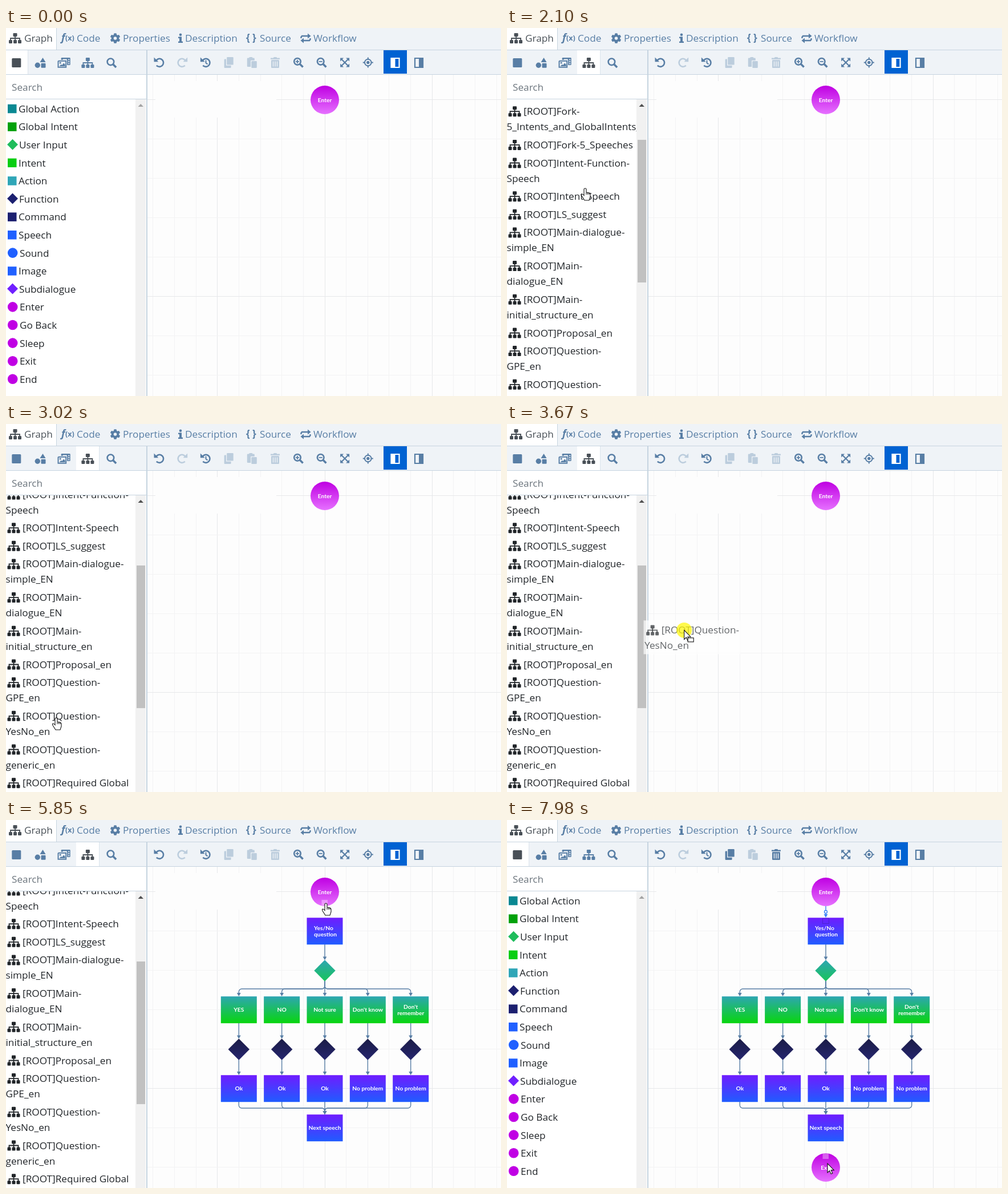
Recreate the animation shown at these times as an HTML page with a canvas. Size 868x645 px, loop 8 s.

```html
<!DOCTYPE html>
<html lang="en">
<head>
<meta charset="utf-8">
<title>Dialogue editor</title>
<style>
html, body { margin: 0; overflow: hidden; background: #fff; }
canvas { display: block; }
</style>
</head>
<body>
<canvas id="stage" width="868" height="645"></canvas>
<script>
const g = document.getElementById('stage').getContext('2d');
const FONT = '"Open Sans", "Noto Sans", sans-serif';
const BLUE = '#587ea5', PALE = '#bccddd', DARK = '#212529', GREY = '#495057';
const BAR = '#eff3f7', EDGE = '#c6d4e0';
const LOOP = 8000;

// ---------- drawing helpers ----------
function rect(x, y, w, h, c) { if (c) g.fillStyle = c; g.fillRect(x, y, w, h); }
function round(x, y, w, h, r = 1.2) { g.beginPath(); g.roundRect(x, y, w, h, r); g.fill(); }
function disc(x, y, r) { g.beginPath(); g.arc(x, y, r, 0, 7); g.fill(); }
function ring(x, y, r, w, a = 0, b = 2 * Math.PI) {
  g.lineWidth = w; g.beginPath(); g.arc(x, y, r, a, b); g.stroke();
}
function trace(p) {
  g.beginPath();
  for (let i = 0; i < p.length; i += 2) g.lineTo(p[i], p[i + 1]);
}
function line(w, ...p) { g.lineWidth = w; trace(p); g.stroke(); }
function poly(...p) { trace(p); g.fill(); }
function diamond(x, y, r) { poly(x, y - r, x + r, y, x, y + r, x - r, y); }
function text(s, x, y, c, font = '17.2px ' + FONT, align = 'left') {
  g.font = font; g.fillStyle = c; g.textAlign = align; g.fillText(s, x, y);
}
function clip(x, y, w, h, draw) {
  g.save(); g.beginPath(); g.rect(x, y, w, h); g.clip(); draw(); g.restore();
}
function ease(t, a, b) {
  const u = Math.min(1, Math.max(0, (t - a) / (b - a)));
  return u * u * (3 - 2 * u);
}

// ---------- icons, centred on 0,0 ----------
const icons = {
  sitemap() {
    round(-3.5, -9, 7, 6);
    line(1.8, -8, 4, -8, 0, 8, 0, 8, 4);
    line(1.8, 0, -4, 0, 4);
    for (const x of [-11, -3, 5]) round(x, 3, 6, 6);
  },
  cog() {
    ring(0, 0, 4.8, 4);
    for (let i = 0; i < 6; i++) { g.rotate(Math.PI / 3); round(-2.4, -8.8, 4.8, 4); }
  },
  info() {
    disc(0, -6.3, 2.3);
    rect(-4, -2.5, 6, 2.5); rect(-2, -2.5, 4, 9); rect(-4, 5.5, 8, 2.5);
  },
  loop() {
    for (let i = 0; i < 2; i++) {
      line(2.4, -8, 0, -8, -2, -6.5, -4, 4, -4);
      poly(3.5, -8.5, 9, -4, 3.5, 0.5);
      g.rotate(Math.PI);
    }
  },
  square() { round(-8, -8, 16, 16, 1.5); },
  shapes() { poly(4.5, -9, 9.5, -1, -0.5, -1); disc(-4.7, 4.2, 4.7); round(1.5, 0.7, 8, 8); },
  media() {
    round(-5, -9, 16, 13);
    for (const y of [-6.5, -3, 0.5]) rect(7.5, y, 2, 2, BAR);
    rect(-2, -6.5, 7, 4);
    rect(-12, -5.2, 17.5, 14.5);
    line(2, -10.2, -3.3, 3.5, -3.3, 3.5, 7.8, -10.2, 7.8, -10.2, -3.3);
    g.fillStyle = g.strokeStyle;
    disc(-6.5, 0, 1.6);
    poly(-8, 6, -5, 2.8, -3.5, 4, -0.5, 0.5, 2, 3, 2, 6);
  },
  search() { ring(-1.7, -1.7, 5.8, 2.6); line(3.4, 2.5, 2.5, 8, 8); },
  undo() { ring(0.6, 0.3, 7, 2.6, -2.7, 2.4); poly(-9, -9, -9, -1.3, -1.3, -1.3); },
  redo() { g.scale(-1, 1); icons.undo(); },
  history() { icons.undo(); line(2, 0.6, -4, 0.6, 0.8, 3.6, 2.8); },
  copy() {
    round(-8, -6, 12, 15.5);
    rect(-4.6, -10, 14, 15.2, BAR);
    g.fillStyle = g.strokeStyle;
    round(-3.4, -9.5, 11.5, 13.6);
  },
  paste() {
    round(-8.5, -8, 13, 15.5); round(-5, -9.5, 6, 4);
    rect(-2.2, -3.6, 12, 14, BAR);
    g.fillStyle = g.strokeStyle;
    round(-1, -2.4, 9.5, 11.9);
  },
  trash() {
    rect(-8, -8, 16, 2.4); round(-3, -9.5, 6, 3); round(-7, -4.5, 14, 14);
    for (const x of [-4.2, -0.7, 2.8]) rect(x, -2, 1.4, 9, BAR);
  },
  zoomOut() { icons.search(); line(1.8, -4.8, -1.7, 1.4, -1.7); },
  zoomIn() { icons.zoomOut(); line(1.8, -1.7, -4.8, -1.7, 1.4); },
  expand() {
    line(2.2, -6, -6, 6, 6); line(2.2, 6, -6, -6, 6);
    for (let i = 0; i < 4; i++) { poly(-8, -8, -2, -8, -8, -2); g.rotate(Math.PI / 2); }
  },
  target() {
    ring(0, 0, 5.8, 2); disc(0, 0, 2.7);
    for (let i = 0; i < 4; i++) { rect(-1, -9, 2, 4); g.rotate(Math.PI / 2); }
  },
  panel() { line(2.2, -7, -8, 7, -8, 7, 8, -7, 8, -7, -9); rect(-7, -8, 7, 16); },
  panelRight() { g.scale(-1, 1); icons.panel(); }
};
function icon(name, x, y, c) {
  g.save();
  g.translate(x, y);
  g.fillStyle = g.strokeStyle = c;
  icons[name]();
  g.restore();
}

// ---------- top bars ----------
function bars(palette, selected) {
  rect(0, 0, 868, 81, BAR);
  rect(0, 0, 88, 38, '#fff');
  rect(88, 0, 1, 38, EDGE);
  rect(0, 38, 868, 1, EDGE);
  icon('sitemap', 16, 18, GREY);
  text('Graph', 32, 24, GREY);
  text('f', 97, 23, BLUE, 'italic bold 18px ' + FONT);
  text('(x)', 104, 22, BLUE, 'bold 12.5px ' + FONT);
  text('Code', 124, 24, BLUE);
  icon('cog', 191.5, 18, BLUE);
  text('Properties', 205, 24, BLUE);
  icon('info', 306, 18, BLUE);
  text('Description', 314, 24, BLUE);
  text('{ }', 421, 23, BLUE, 'bold 17px ' + FONT);
  text('Source', 445, 24, BLUE);
  icon('loop', 525.5, 18, BLUE);
  text('Workflow', 539, 24, BLUE);

  const active = palette ? 0 : 3;
  rect(palette ? 0 : 123, 39, palette ? 38 : 41, 42, '#fff');
  rect(palette ? 38 : 163, 39, 1, 42, '#dbe4ec');
  ['square', 'shapes', 'media', 'sitemap', 'search'].forEach((n, i) =>
    icon(n, 18.3 + 41.7 * i, 61, i === active ? GREY : BLUE));
  ['undo', 'redo', 'history', 'copy', 'paste', 'trash', 'zoomIn', 'zoomOut', 'expand', 'target']
    .forEach((n, i) => {
      const off = n === 'redo' || n === 'paste' || (!selected && (n === 'copy' || n === 'trash'));
      icon(n, 268.5 + 40.7 * i, 60.5, off ? PALE : BLUE);
    });
  rect(662, 39, 41, 41, '#0062d2');
  icon('panel', 682.5, 61, '#fff');
  icon('panelRight', 724, 61, BLUE);
  rect(0, 81, 868, 1, EDGE);
}

// ---------- left panel ----------
const palettes = [
  ['Global Action', 's', '#0a8892'], ['Global Intent', 's', '#02a10b'], ['User Input', 'd', '#1fbd5c'],
  ['Intent', 's', '#08ce12'], ['Action', 's', '#2fa6b7'], ['Function', 'd', '#1c2070'],
  ['Command', 's', '#1c2070'], ['Speech', 's', '#2060ff'], ['Sound', 'c', '#2060ff'],
  ['Image', 's', '#2060ff'], ['Subdialogue', 'd', '#7020ff'], ['Enter', 'c', '#c000e4'],
  ['Go Back', 'c', '#c000e4'], ['Sleep', 'c', '#c000e4'], ['Exit', 'c', '#c000e4'], ['End', 'c', '#c000e4']
];
const dialogues = [
  'Example-|dialogue_EN', 'Fork-|Int_Functions', 'Fork-|5_Intents_and_GlobalIntents_en',
  'Fork-5_Speeches', 'Intent-Function-|Speech', 'Intent-Speech', 'LS_suggest',
  'Main-dialogue-|simple_EN', 'Main-|dialogue_EN', 'Main-|initial_structure_en', 'Proposal_en',
  'Question-|GPE_en', 'Question-|YesNo_en', 'Question-|generic_en', 'Required Global'
];
const ROW = 31.6, TOP = 141.8;

function paletteItem([label, kind, c], y) {
  g.fillStyle = c;
  if (kind === 's') rect(3, y - 8, 15.5, 15.5);
  else if (kind === 'd') diamond(11.5, y - 0.7, 9.5);
  else disc(11.7, y - 0.5, 8.8);
  text(label, { s: 22, d: 23, c: 24 }[kind], y + 6, DARK);
}
function dialogueItem(name, y) {
  const [a, b] = name.split('|');
  icon('sitemap', 13.5, y, DARK);
  text('[ROOT]' + a, 29, y + 6, DARK);
  if (b) text(b, -0.5, y + 33, DARK);
  return b ? ROW + 27.1 : ROW;
}
function panel(palette, scroll) {
  rect(0, 82, 246, 563, '#fff');
  text('Search', 10, 110, '#6c757d');
  clip(0, 125, 228, 520, () => {
    if (palette) palettes.forEach((p, i) => paletteItem(p, TOP + ROW * i));
    else {
      let y = TOP - scroll;
      for (const d of dialogues) y += dialogueItem(d, y);
    }
  });
  rect(0, 124, 246, 1, EDGE);
  rect(227, 125, 18, 520, '#f1f1f1');
  g.fillStyle = scroll > 0 && !palette ? '#505050' : '#a3a3a3';
  poly(231.5, 138, 241, 138, 236.2, 133);
  if (!palette) rect(229, 144 + scroll * 0.46, 15, 250, '#c1c1c1');
  rect(246, 39, 2, 606, EDGE);
}

// ---------- diagram ----------
const MID = 559, cols = [-2, -1, 0, 1, 2].map(i => MID + 75.35 * i);
const BOX = ['#6f1cff', '#205cff'], GREEN = ['#2da6b2', '#08d60e'];
const NAVY = ['#1b1c46', '#25256e'], PINK = ['#bf00e2', '#e671ff'];

function grid() {
  rect(248, 82, 620, 563, '#fdfdfd');
  for (let i = -8; i <= 8; i++)
    rect(Math.floor(MID + 37.65 * i), 82, 1, 563, i % 5 ? '#f3f3f4' : '#e7e8ea');
  for (let j = 0; j < 8; j++)
    rect(248, 125 + 69 * j, 620, 1, j % 5 ? '#f3f3f4' : '#e7e8ea');
  rect(262, 93, 212, 64, '#fdfdfd');
}
function shade(y, h, [a, b]) {
  const s = g.createLinearGradient(0, y - h, 0, y + h);
  s.addColorStop(0, a); s.addColorStop(1, b);
  g.fillStyle = s;
}
function label(s, x, y, align = 'center') {
  const rows = s.split('|');
  rows.forEach((r, i) =>
    text(r, x, y + 3.7 + 11 * (i - (rows.length - 1) / 2), '#fff', 'bold 10.3px Lato, sans-serif', align));
}
function box(x, y, colors, s) {
  shade(y, 23.5, colors);
  g.fillRect(x - 31.5, y - 23.5, 63, 47);
  if (s[0] === 'Y' && s.includes('|')) label(s, x - 19, y, 'left');
  else label(s, x, y);
}
function gem(x, y, colors) { shade(y, 18.5, colors); diamond(x, y, 18.7); }
function ball(y, s, port) {
  shade(y, 25, PINK);
  disc(MID, y, 25);
  label(s, MID, y);
  if (port) rect(553.5, port, 10.5, 10, 'rgba(255,255,255,.35)');
}
function link(x1, y1, x2, y2, bend, c = BLUE, head = true) {
  g.strokeStyle = g.fillStyle = c;
  g.lineWidth = 1.4;
  g.beginPath();
  g.moveTo(x1, y1);
  if (x1 !== x2 && bend) {
    g.arcTo(x1, bend, x2, bend, 5);
    g.arcTo(x2, bend, x2, y2, 5);
  }
  g.lineTo(x2, y2 - (head ? 2 : 0));
  g.stroke();
  if (head) poly(x2 - 3.4, y2 - 6, x2 + 3.4, y2 - 6, x2, y2);
}
function flow() {
  const asks = ['YES', 'NO', 'Not sure', "Don't know", "Don't|remember"];
  link(MID, 218, MID, 245.5);
  cols.forEach((x, i) => {
    link(MID, 282, x, 309, 296);
    link(x, 356, x, 383.5);
    link(x, 420, x, 447);
    link(x, 494, MID, 516, 505);
    box(x, 332.7, GREEN, asks[i]);
    gem(x, 402, NAVY);
    box(x, 470.7, BOX, i < 3 ? 'Ok' : 'No problem');
  });
  gem(MID, 264, ['#2da6b2', '#18c45a']);
  box(MID, 194.8, BOX, 'Yes/No|question');
  box(MID, 539.7, BOX, 'Next speech');
}
function newLink() {
  link(MID, 151, MID, 171, 0, '#3d84f7');
  g.fillStyle = '#fff';
  disc(MID, 161, 2.5);
  ring(MID, 161, 2.5, 1.4);
  g.lineWidth = 1;
  g.strokeStyle = 'rgba(70,30,190,.7)';
  g.strokeRect(553.5, 172.5, 11, 9);
}

// ---------- pointer ----------
const path = [ // time, x, y
  [160, 817, 630], [820, 135, 64], [1820, 135, 64], [2100, 137, 281], [2620, 95, 449],
  [3020, 88, 515], [3140, 79, 514], [3240, 79, 514], [3290, 69, 512], [4060, 560, 206],
  [4140, 560, 206], [4370, 564, 194], [5160, 564, 194], [5600, 553, 133], [5850, 561, 146],
  [5970, 561, 146], [6250, 560, 178], [6340, 560, 178], [6760, 21, 64], [6940, 21, 64],
  [7200, 36, 584], [7280, 36, 584], [7630, 562, 602], [LOOP, 562, 602]
];
function pointerAt(t) {
  const i = path.findIndex(p => p[0] > t);
  const [t0, x0, y0] = path[i - 1], [t1, x1, y1] = path[i];
  const u = ease(t, t0, t1);
  return [x0 + (x1 - x0) * u, y0 + (y1 - y0) * u];
}
const handShape = new Path2D('M-2 2Q-2 0 0 0Q2 0 2 2V7L7 8Q9.3 9 9 11.5V15L7 21H-1L-5.5 14Q-7.5 10.5 -5.5 10Q-4 10 -2 12.5Z');
const arrowShape = new Path2D('M0 0V16L3.7 12.6L6.2 18.4L8.8 17.3L6.3 11.6H11.3Z');
function pointer(x, y, hand, drag) {
  g.save();
  g.translate(x, y);
  g.fillStyle = '#fff';
  g.strokeStyle = '#111';
  g.lineWidth = 1.1;
  const shape = hand ? handShape : arrowShape;
  g.fill(shape); g.stroke(shape);
  if (hand) for (const d of [2, 4.4, 6.8]) line(1, d, 7.5, d, 11);
  if (drag) { rect(6.5, 13.5, 10, 7, '#fff'); g.strokeRect(6.5, 13.5, 10, 7); }
  g.restore();
}
function ghost(dx, dy, y, w, h, draw) {
  g.save();
  g.translate(dx, dy);
  g.globalAlpha = 0.7;
  rect(-2.5, y - 17, w, h, '#fff');
  rect(-2.5, y - 17, 1, h, '#ccc');
  draw();
  g.restore();
}

// ---------- scene ----------
const presses = [[1180, 1360], [3290, 4690], [5970, 6290], [6760, 6830], [7280, 7670]];
const within = (t, a, b) => t >= a && t < b;

function scene(t) {
  const palette = t < 1270 || t >= 6830;
  const scroll = 113 * (ease(t, 1880, 2060) + ease(t, 2150, 2330));
  const linked = t >= 6290;
  const [x, y] = t >= 160 ? pointerAt(t) : [-99, -99];
  const onEnter = within(t, 5480, 6290);

  grid();
  if (t >= 4840) flow();
  ball(126, 'Enter', onEnter && 140);
  if (within(t, 5970, 6290)) link(MID, 151, x, Math.max(152, y), 0, '#3d84f7', y > 162);
  if (linked) newLink();
  if (t >= 7800) ball(609, 'Exit', 584);
  bars(palette, linked);
  panel(palette, scroll);

  const dragDialogue = within(t, 3310, 4690), dragExit = within(t, 7300, 7670);
  if (dragDialogue) ghost(x - 69, y - 512 + 312, 200, 170, 59, () => dialogueItem('Question-|YesNo_en', 200));
  if (dragExit) ghost(x - 36, y - 584, 584, 62, 31, () => paletteItem(palettes[14], 584));
  if (presses.some(p => within(t, ...p))) {
    g.fillStyle = 'rgba(255,246,0,.7)';
    disc(x, y, 13.5);
  }
  if (t >= 160) {
    const drag = dragDialogue || dragExit;
    pointer(x, y, !drag && (x < 246 || within(t, 5480, 5970)), drag);
  }
}
function tick(now) {
  scene(now % LOOP);
  requestAnimationFrame(tick);
}
requestAnimationFrame(tick);
</script>
</body>
</html>
```
